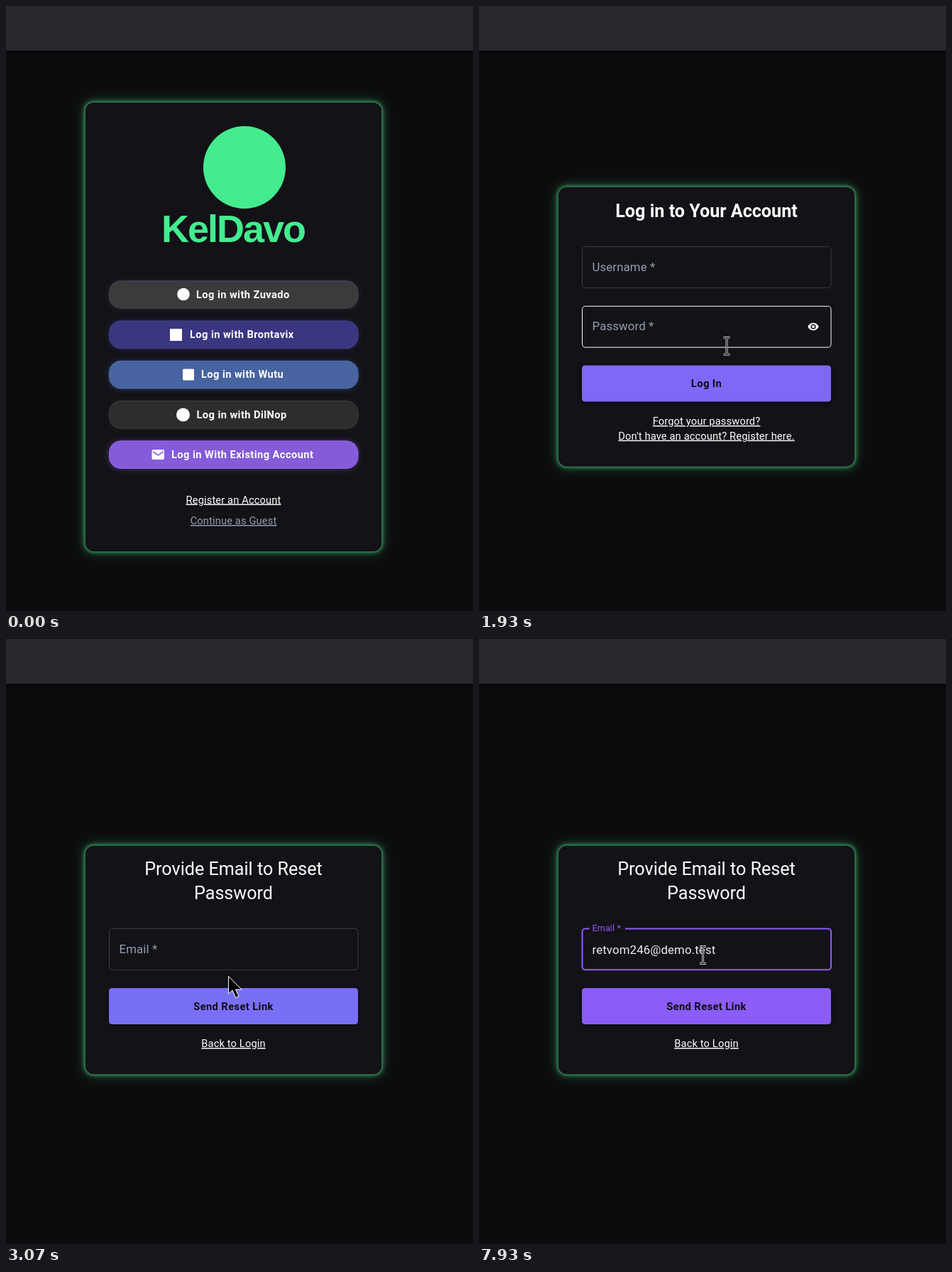
An HTML page for the animation above (8 s loop, 658 px wide and 851 px high).

```html
<!DOCTYPE html>
<html lang="en">
<head>
<title>Login flow</title>
<style>
  html, body { margin: 0; width: 100%; height: 100%; overflow: hidden; background: #0c0c0e; }
  svg { display: block; width: 100vw; height: 100vh; font-family: Roboto, sans-serif; }
  text { white-space: pre; }
  .btn { font-size: 14.67px; font-weight: 700; letter-spacing: .42px; }
  .link { font-size: 14.67px; letter-spacing: .138px; text-decoration: underline; }
  .title { font-size: 25.14px; }
  .field { font-size: 16.76px; letter-spacing: .157px; }
  .mid { text-anchor: middle; }
</style>
</head>
<body>
<svg id="stage" viewBox="0 0 658 851" preserveAspectRatio="none">
  <defs>
    <filter id="near" x="-20%" y="-20%" width="140%" height="140%"><feGaussianBlur stdDeviation="2.6"/></filter>
    <filter id="far" x="-20%" y="-20%" width="140%" height="140%"><feGaussianBlur stdDeviation="8"/></filter>
    <filter id="soft" x="-10%" y="-60%" width="120%" height="220%"><feGaussianBlur stdDeviation="4"/></filter>
    <linearGradient id="fade" x2="0" y2="1">
      <stop stop-color="#000" stop-opacity=".5"/><stop offset="1" stop-color="#000" stop-opacity="0"/>
    </linearGradient>
  </defs>
  <rect width="658" height="851" fill="#0c0c0e"/>
  <rect width="658" height="63" fill="#29282d"/>
  <rect y="63" width="658" height="7" fill="url(#fade)"/>
  <g id="pages"></g>
  <g id="cursor" stroke-linejoin="round">
    <path id="arrow" fill="#000" stroke="#fff" d="M.5.5V25L6 20L10.7 30.5L15 28.5L10.5 19H19Z"/>
    <path id="hand" fill="#fff" stroke="#000" d="M-2 2Q-2 0 0 0T2 2V8.5Q3.5 7.5 5 9Q6.5 8.3 7.7 10Q10 9.5 10.3 12V16Q10 19 9 22.5H-1Q-2 19.5 -4 17L-6 13.5Q-6 11 -4 11.7L-2 13.7Z"/>
    <g id="beam" fill="none"></g>
  </g>
</svg>
<script>
const LOOP = 8000;
const CENTER = 320.5;
const PURPLE = [139, 92, 246], BLUE = [90, 143, 245];
const CARD = '#131217', BORDER = '#3d3d42', ACCENT = '#8b5cf6', MUTED = '#94a0b0';
const $ = id => document.getElementById(id);

const clamp = v => Math.max(0, Math.min(1, v));
const smooth = v => { v = clamp(v); return v * v * (3 - 2 * v); };
const lerp = (a, b, k) => a + (b - a) * k;
const mix = (a, b, k) => `rgb(${a.map((v, i) => Math.round(lerp(v, b[i], k)))})`;

// Hover fade: rises from `enter`, falls from whatever was reached at `leave`.
const hover = (t, enter, leave) =>
  smooth((Math.min(t, leave) - enter) / 250) * (1 - smooth((t - leave) / 250));

const label = (cls, x, y, text, fill = '#fff', extra = '') =>
  `<text class="${cls}" x="${x}" y="${y}" fill="${fill}" ${extra}>${text}</text>`;

const link = (y, text, fill) => label('link mid', CENTER, y, text, fill);

const box = (x, y, w, h, r, fill, extra = '') =>
  `<rect x="${x}" y="${y}" width="${w}" height="${h}" rx="${r}" fill="${fill}" ${extra}/>`;

function card(top, bottom) {
  const h = bottom - top;
  return box(111, top, 419, h, 12.6, '#4ade80', 'opacity=".42" filter="url(#far)"') +
    box(110.5, top - .5, 420, h + 1, 13, '#4ade80', 'opacity=".62" filter="url(#near)"') +
    box(111.2, top + .2, 418.6, h - .4, 12.6, CARD, 'stroke="#2b7650" stroke-width="1.2"');
}

function pill(y, fill, border, textX, text, icon, id = '') {
  return box(145, y + 1, 351, 39, 16, fill, 'opacity=".45" filter="url(#soft)"') +
    box(145.5, y + .5, 350.5, 38.7, 16, fill, `stroke="${border}" ${id}`) +
    icon + label('btn', textX, y + 24.5, text);
}

const field = (y, id) => box(145.5, y + .5, 350.5, 57.8, 4.2, 'none', `id="${id}" stroke="${BORDER}"`);

const action = (y, id, text) =>
  box(145, y + 2, 351, 51, 4.2, '#000', 'opacity=".5" filter="url(#near)"') +
  box(145, y, 351, 51, 4.2, ACCENT, `id="${id}"`) +
  label('btn mid', CENTER, y + 30.5, text, '#0d0c12');

const disc = (x, y, r) => `<circle cx="${x}" cy="${y}" r="${r}" fill="#fff"/>`;
const mail = box(205.5, 624, 17.5, 14, 2, '#fff') +
  '<path d="M207 627l7.3 4.8l7.3-4.8" fill="none" stroke="#855bd9" stroke-width="1.6"/>';
const eye = `<path transform="translate(462.6 442.6) scale(.7)" fill="#fff" fill-rule="evenodd"
  d="M12 4.5C7 4.5 2.73 7.61 1 12c1.73 4.39 6 7.5 11 7.5s9.27-3.11 11-7.5c-1.73-4.39-6-7.5-11-7.5z
  M12 17a5 5 0 1 1 0-10a5 5 0 1 1 0 10z M12 9a3 3 0 1 0 0 6a3 3 0 1 0 0-6z"/>`;

const welcome = card(135, 768) +
  '<circle cx="336" cy="227" r="58" fill="#44ec8f"/>' +
  `<text class="mid" x="320" y="332" fill="#44ec8f" font-family="'Liberation Sans', sans-serif"
    font-size="54" font-weight="700" letter-spacing="-2">KelDavo</text>` +
  pill(386, '#3b3b3b', '#3b4557', 268, 'Log in with Zuvado', disc(250, 405.5, 8.8)) +
  pill(442.4, '#3a3680', '#40458e', 259, 'Log in with Brontavix', box(231, 454, 17, 17, 0, '#fff')) +
  pill(498.8, '#4763a0', '#4f70ad', 275, 'Log in with Wutu', box(249, 510.5, 16, 16, 1.5, '#fff')) +
  pill(555, '#2d2d2d', '#3d3d3d', 268.5, 'Log in with DilNop', disc(249.5, 575, 9.5)) +
  pill(611.3, '#855bd9', '#9068dd', 233, 'Log in With Existing Account', mail, 'id="existing"') +
  link(699.5, 'Register an Account') + link(729, 'Continue as Guest', MUTED);

const login = card(254, 648.5) +
  label('title mid', CENTER, 296.5, 'Log in to Your Account', '#fff', 'font-weight="700"') +
  field(338, 'userBox') + label('field', 159.5, 372.7, 'Username *', MUTED) +
  field(421.8, 'passBox') + label('field', 159.5, 456.4, 'Password *', MUTED) + eye +
  action(505.5, 'loginBtn', 'Log In') +
  link(589, 'Forgot your password?') + link(609.7, "Don't have an account? Register here.");

const reset = card(290, 613) +
  label('title mid', CENTER, 332, 'Provide Email to Reset') +
  label('title mid', CENTER, 365.5, 'Password') +
  field(407, 'mailBox') + box(155.5, 405, 50.5, 5, 0, CARD, 'id="notch"') +
  label('field', 0, 0, 'Email *', MUTED, 'id="mailLabel"') +
  label('field', 159.5, 443, '', '#eeeef0', 'id="mailText"') +
  box(0, 427, 1, 19.5, 0, '#fff', 'id="caret"') +
  action(491, 'sendBtn', 'Send Reset Link') + link(574, 'Back to Login');

$('pages').innerHTML = [welcome, login, reset].map((p, i) => `<g id="page${i}">${p}</g>`).join('');

const beamPath = 'M-4.5-12H-2Q0-12 0-10V10Q0 12-2 12H-4.5M4.5-12H2Q0-12 0-10V10Q0 12 2 12H4.5';
$('beam').innerHTML = `<path d="${beamPath}" stroke="#d8d8d8" stroke-width="3"/>
  <path d="${beamPath}" stroke="#111" stroke-width="1.2"/>`;

// time, x, y, shape
const PATH = [
  [130, 650, 842, 'arrow'], [400, 545, 742, 'arrow'], [580, 465, 668, 'arrow'],
  [660, 442, 649, 'hand'], [800, 428, 640, 'hand'], [930, 424, 637, 'hand'],
  [1000, 424, 637, 'arrow'], [1670, 424, 637, 'arrow'], [1790, 405, 590, 'hand'],
  [1880, 368, 505, 'arrow'], [1920, 350, 478, 'beam'], [1980, 344, 480, 'arrow'],
  [2030, 341, 506, 'hand'], [2130, 340, 525, 'hand'], [2270, 341, 533, 'hand'],
  [2340, 343, 557, 'arrow'], [2390, 350, 576, 'hand'], [2530, 356, 589, 'hand'],
  [2730, 355, 588, 'hand'], [2870, 352, 585, 'arrow'], [2910, 338, 542, 'hand'],
  [3020, 318, 490, 'arrow'], [3070, 313, 474, 'arrow'], [3130, 313, 464, 'beam'],
  [3330, 314.5, 444, 'beam'], [3720, 314.5, 444, 'beam'], [3730, 315.5, 444.5, 'beam']
];
const FOCUS = 3400;
const EMAIL = 'retvom246@demo.test';
const KEYS = [3870, 4000, 4130, 4470, 4670, 4730, 5000, 5600, 5800, 6130,
  6400, 6530, 6670, 6730, 6930, 7070, 7200, 7270, 7400];

function set(id, attrs) {
  for (const k in attrs) $(id).setAttribute(k, attrs[k]);
}
const show = (id, on) => set(id, { visibility: on ? 'inherit' : 'hidden' });

function drawCursor(t) {
  show('cursor', t >= PATH[0][0]);
  let i = 0;
  while (i < PATH.length - 1 && t >= PATH[i + 1][0]) i++;
  const a = PATH[i], b = PATH[i + 1] || a;
  const k = b === a ? 0 : clamp((t - a[0]) / (b[0] - a[0]));
  set('cursor', { transform: `translate(${lerp(a[1], b[1], k)} ${lerp(a[2], b[2], k)})` });
  for (const s of ['arrow', 'hand', 'beam']) show(s, s === a[3]);
}

function drawEmail(t) {
  const focused = t >= FOCUS;
  const k = smooth((t - FOCUS) / 200);
  const over = t >= 3130;
  set('mailBox', {
    stroke: focused ? ACCENT : over ? '#fff' : BORDER,
    'stroke-width': focused ? 2.1 : 1
  });
  set('notch', { width: 50.5 * k });
  set('mailLabel', {
    transform: `translate(159.5 ${lerp(441.7, 411, k)}) scale(${lerp(1, .75, k)})`,
    fill: focused ? ACCENT : MUTED
  });
  const count = KEYS.filter(key => t >= key).length;
  $('mailText').textContent = EMAIL.slice(0, count);
  const last = count ? KEYS[count - 1] : FOCUS;
  const blinkOn = (t - last) % 1060 < 530;
  const caretOn = focused && blinkOn;
  if ($('page2').getAttribute('visibility') !== 'hidden') show('caret', caretOn);
  set('caret', { x: Math.round(159.5 + (count ? $('mailText').getComputedTextLength() : 0)) });
}

function draw(t) {
  const page = t < 1000 ? 0 : t < 2870 ? 1 : 2;
  for (let i = 0; i < 3; i++) show('page' + i, i === page);
  set('existing', { fill: mix([133, 91, 217], [145, 102, 230], hover(t, 650, 1000)) });
  set('loginBtn', { fill: mix(PURPLE, BLUE, hover(t, 1850, 2340)) });
  set('sendBtn', { fill: mix(PURPLE, BLUE, hover(t, 2910, 3020)) });
  set('passBox', { stroke: t >= 1915 && t < 1985 ? '#fff' : BORDER });
  drawEmail(t);
  drawCursor(t);
}

let start;
function tick(now) {
  start ??= now;
  draw((now - start) % LOOP);
  requestAnimationFrame(tick);
}
draw(0);
requestAnimationFrame(tick);
</script>
</body>
</html>
```
